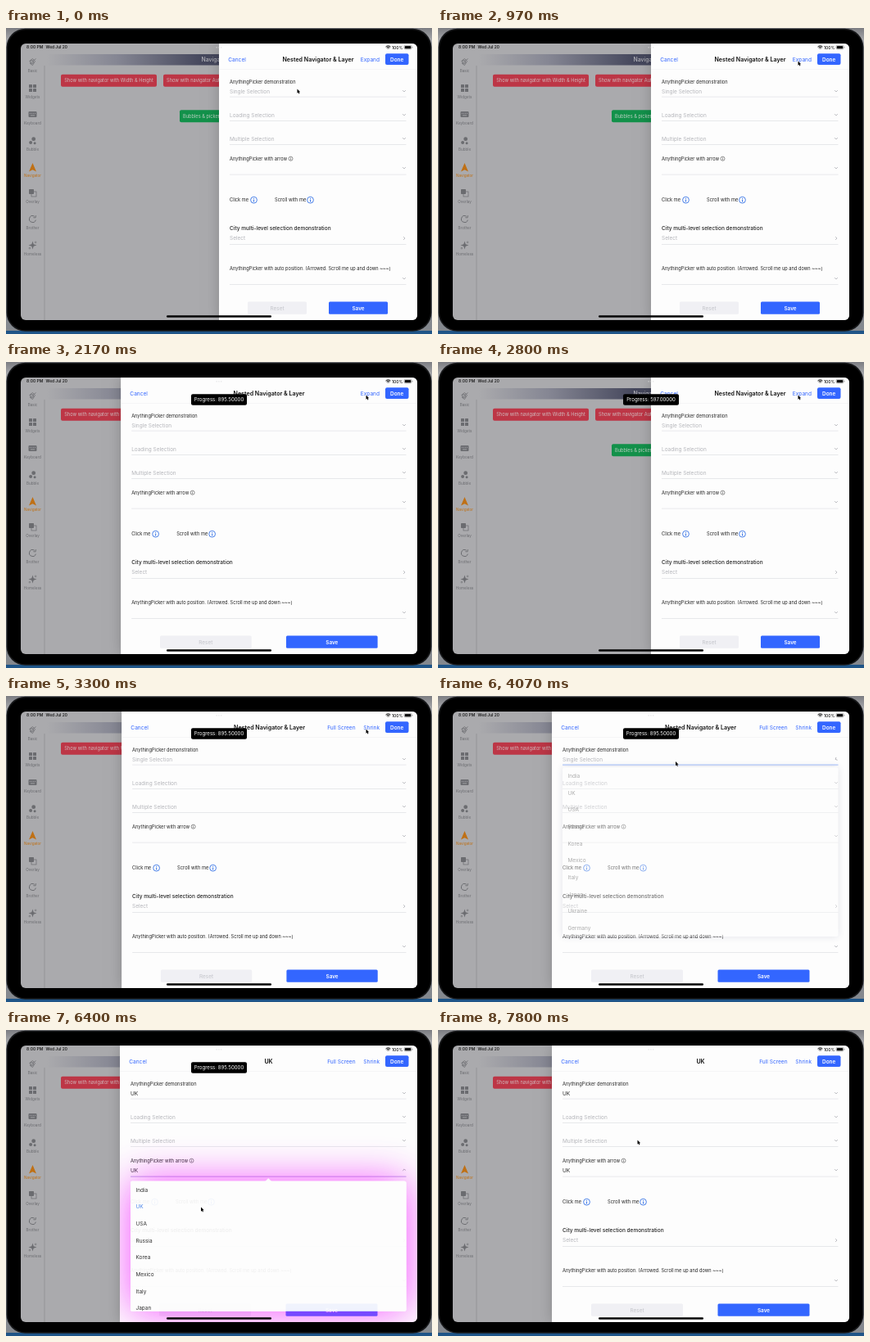
Write an HTML page with a canvas that moves like this. It is 520 px wide and 374 px high and loops after 8000 ms.

```html
<!DOCTYPE html>
<html lang="en">
<head>
<meta charset="utf-8">
<title>Nested navigator demo</title>
<style>
  html, body { margin: 0; width: 100%; height: 100%; overflow: hidden; background: #000; }
  canvas { display: block; width: 520px; height: 374px; }
</style>
</head>
<body>
<canvas id="stage"></canvas>
<script>
const LOOP = 8000, RIGHT = 502;
const NARROW = 260, WIDE = 139;
const BLUE = '#3366ff', INK = '#222', HINT = '#b4b5ba', LINE = '#e3e4e8', DIMMED = '#aaaaad';
const COUNTRIES = ['India', 'UK', 'USA', 'Russia', 'Korea', 'Mexico', 'Italy', 'Japan', 'Ukraine', 'Germany'];

const canvas = document.getElementById('stage');
const ctx = canvas.getContext('2d');
const ratio = window.devicePixelRatio || 1;
canvas.width = 520 * ratio;
canvas.height = 374 * ratio;

const clamp = v => Math.min(1, Math.max(0, v));
const mix = (a, b, k) => a + (b - a) * k;
const ease = k => k * k * (3 - 2 * k);
const ramp = (t, from, to) => clamp((t - from) / (to - from));

// Pointer stops: time, x, y
const POINTER = [
  [0, 355.5, 74.5], [100, 355.5, 74.5], [850, 439.5, 40.5], [3450, 439.5, 40.5],
  [3900, 290, 80], [4250, 290, 80], [4550, 226, 115], [4780, 226, 115],
  [5200, 225, 171.5], [5850, 225, 171.5], [6200, 238, 216.5], [6700, 238, 216.5],
  [7200, 242, 168.5], [7430, 242, 168.5], [7770, 243.5, 134.5], [LOOP, 243.5, 134.5]
];

function pointerAt(t) {
  let i = 1;
  while (i < POINTER.length - 1 && t >= POINTER[i][0]) i++;
  const a = POINTER[i - 1], b = POINTER[i];
  const k = ease(ramp(t, a[0], b[0]));
  return [mix(a[1], b[1], k), mix(a[2], b[2], k)];
}

function text(str, x, y, size, color, weight = 400, align = 'left') {
  ctx.font = `${weight} ${size}px Inter, Roboto, sans-serif`;
  ctx.fillStyle = color;
  ctx.textAlign = align;
  ctx.fillText(str, x, y + size * 0.4);
}

function box(x, y, w, h, r, color) {
  ctx.beginPath();
  ctx.roundRect(x, y, w, h, r);
  ctx.fillStyle = color;
  ctx.fill();
}

function path(points, color, width = 0.8) {
  ctx.beginPath();
  points.forEach(([x, y]) => ctx.lineTo(x, y));
  ctx.strokeStyle = color;
  ctx.lineWidth = width;
  ctx.stroke();
}

function polygon(points, color) {
  ctx.beginPath();
  points.forEach(([x, y]) => ctx.lineTo(x, y));
  ctx.closePath();
  ctx.fillStyle = color;
  ctx.fill();
}

function ring(x, y, r, color, width = 0.8) {
  ctx.beginPath();
  ctx.arc(x, y, r, 0, 7);
  ctx.strokeStyle = color;
  ctx.lineWidth = width;
  ctx.stroke();
}

function dot(x, y, r, color) {
  ctx.beginPath();
  ctx.arc(x, y, r, 0, 7);
  ctx.fillStyle = color;
  ctx.fill();
}

function info(x, y, r, color) {
  ring(x, y, r, color, r * 0.22);
  ctx.fillStyle = color;
  ctx.fillRect(x - r * 0.11, y - r * 0.15, r * 0.25, r * 0.75);
  ctx.fillRect(x - r * 0.11, y - r * 0.6, r * 0.25, r * 0.25);
}

function chevron(x, y, angle = 0) {
  ctx.save();
  ctx.translate(x, y);
  ctx.rotate(angle);
  path([[-1.9, -0.9], [0, 1], [1.9, -0.9]], '#a3a4aa', 0.7);
  ctx.restore();
}

function device() {
  const edge = ctx.createLinearGradient(0, 0, 0, 370);
  edge.addColorStop(0, '#7c7d82');
  edge.addColorStop(0.04, '#a6a7aa');
  edge.addColorStop(1, '#84888e');
  ctx.fillStyle = edge;
  ctx.fillRect(0, 0, 520, 370);
  ctx.fillStyle = '#1f5588';
  ctx.fillRect(0, 370, 520, 4);
  box(0.5, 0.8, 519, 370, 23, '#17181a');
  box(2, 2.3, 516, 367, 22, '#000');
}

const ICONS = [
  (x, y, c) => {
    path([[x - 4, y - 1], [x, y - 4], [x + 3, y - 1], [x, y + 4], [x - 3, y + 2], [x + 4, y - 4]], c);
    ring(x - 1, y, 2, c);
  },
  (x, y, c) => {
    for (const [dx, dy] of [[-4.5, -4.5], [0.5, -4.5], [-4.5, 0.5], [0.5, 0.5]]) box(x + dx, y + dy, 4, 4, 0.6, c);
  },
  (x, y, c) => {
    box(x - 5, y - 3.5, 10, 7, 1, c);
    ctx.fillStyle = DIMMED;
    for (let i = 0; i < 4; i++) ctx.fillRect(x - 3.6 + i * 2, y - 1.7, 1, 1);
    ctx.fillRect(x - 2.5, y + 1, 5, 0.8);
  },
  (x, y, c) => { dot(x + 1.2, y - 1.8, 2.4, c); dot(x - 2.4, y + 2.4, 2, c); dot(x + 2.6, y + 3.2, 1.5, c); },
  (x, y, c) => polygon([[x, y - 5.5], [x + 4.5, y + 5], [x, y + 2.7], [x - 4.5, y + 5]], c),
  (x, y, c) => {
    box(x - 4.5, y - 4.5, 6, 6, 0.8, c);
    ctx.strokeStyle = c;
    ctx.lineWidth = 0.7;
    ctx.strokeRect(x - 1.5, y - 1.5, 6, 6);
  },
  (x, y, c) => {
    ctx.beginPath();
    ctx.arc(x, y, 4, 0.3, 5.5);
    ctx.strokeStyle = c;
    ctx.lineWidth = 1;
    ctx.stroke();
    path([[x + 4, y - 4.5], [x + 3.6, y - 1.6], [x + 0.8, y - 1.8]], c);
  },
  (x, y, c) => {
    polygon([[x, y - 5], [x + 1.2, y - 1.2], [x + 5, y], [x + 1.2, y + 1.2], [x, y + 5],
      [x - 1.2, y + 1.2], [x - 5, y], [x - 1.2, y - 1.2]], c);
    ring(x + 3.6, y - 3.6, 0.9, c, 0.6);
    ring(x - 3.6, y + 3.6, 0.9, c, 0.6);
  }
];
const TABS = ['Basic', 'Widgets', 'Keyboard', 'Bubble', 'Navigator', 'Overlay', 'Brother', 'Homeless'];

function backPage() {
  ctx.fillStyle = DIMMED;
  ctx.fillRect(18, 19, 484, 338);
  ctx.fillStyle = '#8f8f92';
  ctx.fillRect(46.6, 46, 0.8, 311);

  const bar = ctx.createLinearGradient(50, 0, 240, 0);
  bar.addColorStop(0, DIMMED);
  bar.addColorStop(0.45, '#858693');
  bar.addColorStop(1, '#45475c');
  ctx.fillStyle = bar;
  ctx.fillRect(47, 32, 455, 13.5);
  text('Navigator', 238.5, 38.5, 6.9, '#b4b4ba', 500);

  box(67, 56.7, 117, 15, 2, '#bd3646');
  text('Show with navigator with Width & Height', 125.5, 64, 5.67, '#d0bcbf', 400, 'center');
  box(192, 56.7, 117, 15, 2, '#bd3646');
  text('Show with navigator Auto Size', 196, 64, 5.67, '#d0bcbf');
  box(212, 100.2, 97, 15, 2, '#12914a');
  text('Bubbles & pickers', 216, 107.5, 5.67, '#b9cfc1');

  TABS.forEach((name, i) => {
    const y = 42 + i * 32, color = i === 4 ? '#bf7015' : '#6b6c70';
    ICONS[i](32.5, y - 0.5 + (i === 4 ? 1 : 0), color);
    text(name, 32.5, y + 10, 4.6, color, 400, 'center');
  });
}

function statusBar() {
  text('8:00 PM', 25, 23.4, 5, '#111', 500);
  text('Wed Jul 20', 48.5, 23.4, 4.9, '#111', 500);
  ctx.fillStyle = '#dcdcde';
  for (let i = 0; i < 3; i++) ctx.fillRect(256.6 + i * 2.8, 23.3, 1.1, 1.1);
  for (const r of [1.2, 2.7, 4.2]) {
    ctx.beginPath();
    ctx.arc(466.5, 26, r, Math.PI * 1.25, Math.PI * 1.75);
    ctx.strokeStyle = '#111';
    ctx.lineWidth = 1;
    ctx.stroke();
  }
  text('100%', 471, 23.6, 5, '#111', 500);
  ctx.beginPath();
  ctx.roundRect(486, 21.3, 9, 4.6, 1.3);
  ctx.strokeStyle = '#777';
  ctx.lineWidth = 0.5;
  ctx.stroke();
  box(486.7, 22, 7.6, 3.2, 0.8, '#111');
  ctx.fillStyle = '#777';
  ctx.fillRect(495.7, 22.9, 0.6, 1.4);
}

function panel(s) {
  const left = s.left, x = left + 13, end = 488.5;
  const grow = (NARROW - left) / (NARROW - WIDE);
  const rule = (y, color = LINE) => {
    ctx.fillStyle = color;
    ctx.fillRect(x, y, end - x, 0.8);
  };

  ctx.save();
  ctx.shadowColor = 'rgba(0,0,0,.2)';
  ctx.shadowBlur = 16 * ratio;
  ctx.fillStyle = '#fdfdfd';
  ctx.fillRect(left, 19, RIGHT - left, 338);
  ctx.restore();
  ctx.save();
  ctx.beginPath();
  ctx.rect(left, 19, RIGHT - left, 338);
  ctx.clip();

  text('Cancel', left + 11.2, 38.1, 6.6, BLUE);
  text(s.first ? 'UK' : 'Nested Navigator & Layer', (left + RIGHT) / 2, 38.1, 7.1, '#111', 600, 'center');
  if (s.wide) text('Full Screen', 426.5, 38.1, 6.56, BLUE, 400, 'right');
  text(s.wide ? 'Shrink' : 'Expand', 456, 38.1, 6.56, BLUE, 400, 'right');
  box(463, 31.3, 28.5, 13.6, 2, BLUE);
  text('Done', 477.2, 38.1, 6.4, '#fff', 600, 'center');
  ctx.fillStyle = '#f0f0f2';
  ctx.fillRect(left, 50, RIGHT - left, 0.6);

  text('AnythingPicker demonstration', x, 65.5, 5.67, INK);
  text(s.first ? 'UK' : 'Single Selection', x, 77, 6.48, s.first ? INK : HINT);
  rule(83.7, s.focus === 1 ? '#86a8f8' : LINE);
  chevron(486, 77, s.list1 * Math.PI);

  text('Loading Selection', x, 106, 6.48, HINT);
  rule(113);
  chevron(486, 106);
  text('Multiple Selection', x, 135.1, 6.48, HINT);
  rule(142.2);
  chevron(486, 135);

  text('AnythingPicker with arrow', x, 159.5, 5.67, INK);
  info(x + 74.5, 159.7, 2.5, '#333');
  if (s.second) text('UK', x, 171, 6.48, INK);
  rule(178.7, s.focus === 2 ? '#a58bdc' : LINE);
  chevron(486, 171, s.list2 * Math.PI);

  text('Click me', x, 210, 5.67, INK);
  info(x + 29.5, 210.2, 3.9, '#2f6ee6');
  text('Scroll with me', x + 55, 210, 5.75, INK);
  info(x + 98.5, 210.2, 3.9, '#2f6ee6');

  text('City multi-level selection demonstration', x, 244.8, 6.5, INK, 500);
  text('Select', x, 256.8, 6.48, HINT);
  rule(264);
  chevron(486, 257, -Math.PI / 2);

  text('AnythingPicker with auto position. (Arrowed. Scroll me up and down ~~~)', x, 294.2, 5.67, INK);
  rule(313);
  chevron(486, 306);

  const w = mix(72, 112, grow);
  const resetX = left + mix(35, 48, grow), saveX = left + mix(134, 202.5, grow);
  box(resetX, 334.5, w, 15.2, 1.5, '#f0f0f4');
  text('Reset', resetX + w / 2, 342.1, 6.4, '#c3c4ca', 400, 'center');
  box(saveX, 334.5, w, 15.2, 1.5, BLUE);
  text('Save', saveX + w / 2, 342.1, 6.4, '#fff', 600, 'center');

  if (s.list1) dropdown(x, 87, end - x, 207, s.list1, 'rgba(60,70,110,.4)', 9, false, s.first);
  if (s.list2) dropdown(x, 184.8, end - x, 159, s.list2, 'rgba(240,20,255,.85)', 50, true, s.second);
  ctx.restore();
}

function dropdown(x, y, w, h, alpha, glow, blur, arrow, picked) {
  ctx.save();
  ctx.globalAlpha = alpha;

  // The glow stays outside the list, so a half-faded list remains white
  ctx.save();
  ctx.beginPath();
  ctx.rect(0, 0, 520, 374);
  ctx.roundRect(x, y, w, h, 2);
  ctx.clip('evenodd');
  ctx.shadowColor = glow;
  ctx.shadowBlur = blur * ratio;
  box(x, y, w, h, 2, '#fdfdfd');
  ctx.restore();

  box(x, y, w, h, 2, '#fdfdfd');
  if (arrow) {
    const c = x + w / 2;
    polygon([[c - 4, y + 0.3], [c, y - 3.5], [c + 4, y + 0.3]], '#fdfdfd');
  }
  ctx.beginPath();
  ctx.rect(x, y, w, h);
  ctx.clip();
  COUNTRIES.forEach((name, i) => {
    text(name, x + 6.5, y + 10.4 + i * 20.65, 6.48, picked && name === 'UK' ? '#3c7be8' : INK);
  });
  ctx.restore();
}

function toast(value, alpha) {
  ctx.save();
  ctx.globalAlpha = alpha;
  box(226, 39.3, 68, 13.4, 2, '#000');
  text('Progress: ' + value.toFixed(5), 260, 46, 6.07, '#fff', 400, 'center');
  ctx.restore();
}

function pointer(x, y) {
  const shape = [[0, 0], [0, 5.2], [1.2, 4.2], [2, 6], [2.9, 5.6], [2.1, 3.8], [3.7, 3.7]];
  const at = shape.map(([dx, dy]) => [x + dx, y + dy]);
  path([...at, at[0]], '#fff', 0.7);
  polygon(at, '#000');
}

function stateAt(t) {
  const grow = ease(ramp(t, 1080, 1450)) - ease(ramp(t, 2150, 2520)) + ease(ramp(t, 2960, 3330));
  return {
    left: mix(NARROW, WIDE, grow),
    wide: (t >= 1080 && t < 2150) || t >= 2960,
    list1: ramp(t, 3980, 4230) - ramp(t, 4680, 4930),
    list2: ramp(t, 5748, 5998) - ramp(t, 6385, 6635),
    first: t >= 4680,
    second: t >= 6385,
    focus: t >= 3980 && t < 4930 ? 1 : t >= 5748 && t < 6635 ? 2 : 0,
    toast: ramp(t, 1120, 1320) - ramp(t, 6750, 6950),
    progress: t >= 2190 && t < 3000 ? 597 : 895.5
  };
}

function draw(t) {
  const s = stateAt(t);
  ctx.setTransform(ratio, 0, 0, ratio, 0, 0);
  device();
  ctx.save();
  ctx.beginPath();
  ctx.roundRect(18, 19, 484, 338, 6);
  ctx.clip();
  backPage();
  panel(s);
  statusBar();
  box(196, 351.3, 128, 2.4, 1.2, '#000');
  if (s.toast) toast(s.progress, s.toast);
  ctx.restore();
  pointer(...pointerAt(t));
}

const start = performance.now();
function frame() {
  draw((performance.now() - start) % LOOP);
  requestAnimationFrame(frame);
}
frame();
</script>
</body>
</html>
```
